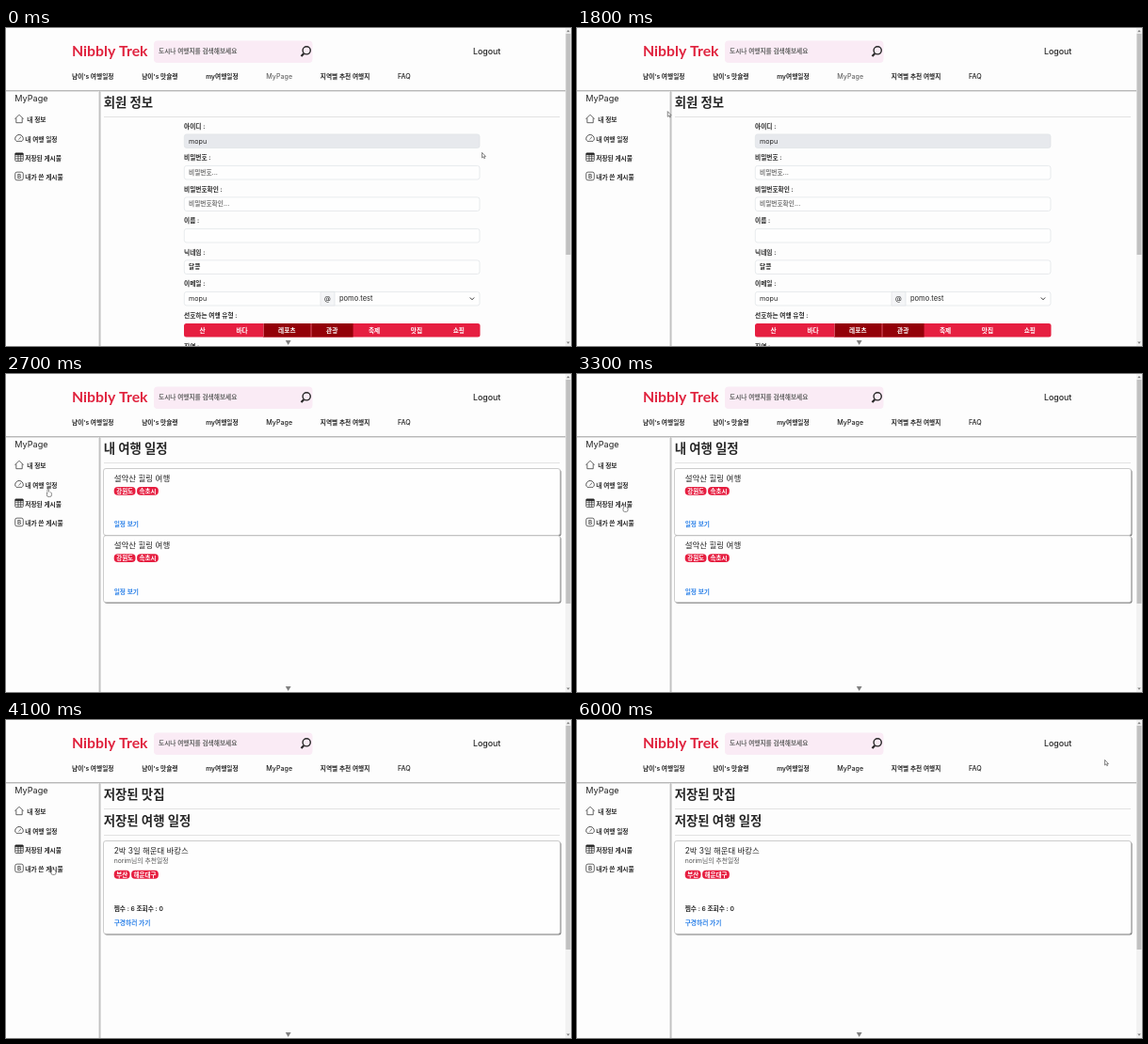
These frames come from a looping animation (600 by 338 pixels, 6.1 s). An HTML page with a canvas:

```html
<!DOCTYPE html>
<html lang="ko">
<head>
<meta charset="utf-8">
<style>
html, body { margin: 0; width: 100%; height: 100%; overflow: hidden; background: #fdfdfd; }
canvas { display: block; width: 600px; height: 338px; }
</style>
</head>
<body>
<canvas id="stage" width="600" height="338"></canvas>
<script>
const ctx = document.getElementById('stage').getContext('2d');
const LOOP = 6100, STEP = 100;
const INK = '#262626', RED = '#e61e40', DARK_RED = '#930008', BLUE = '#2b80e8', LINE = '#dfe2e6';
const FONT = "Inter, 'Noto Sans CJK KR', 'Noto Sans CJK', sans-serif";

// Each move: start time, end time, destination
const MOVES = [
  [0, 400, 560, 126], [800, 900, 67, 108], [1400, 1700, 115, 86], [1700, 2100, 38, 95],
  [2100, 2500, 41, 118], [2600, 3100, 48, 138], [3500, 4100, 47, 156],
  [4800, 5100, 50, 124], [5100, 5500, 594, 48], [5500, 6000, 560, 42]
];

const progress = (t, from, to) => Math.min(1, Math.max(0, (t - from) / (to - from)));

function setFont(size, weight, family = FONT) {
  ctx.font = `${weight} ${size}px ${family}`;
}

// Draws text centred on a line and returns its width
function text(str, x, centerY, { size = 6.7, weight = 600, color = INK, align = 'left', family } = {}) {
  setFont(size, weight, family);
  ctx.fillStyle = color;
  ctx.textAlign = align;
  ctx.fillText(str, x, centerY + size * 0.36);
  return ctx.measureText(str).width;
}

function rect(x, y, w, h, color) {
  ctx.fillStyle = color;
  ctx.fillRect(x, y, w, h);
}

function paint(fill, stroke, width = 0.7) {
  if (fill) { ctx.fillStyle = fill; ctx.fill(); }
  if (stroke) { ctx.strokeStyle = stroke; ctx.lineWidth = width; ctx.stroke(); }
}

function box(x, y, w, h, radius, fill, stroke, width) {
  ctx.beginPath();
  ctx.roundRect(x, y, w, h, radius);
  paint(fill, stroke, width);
}

function path(points, fill, stroke, width) {
  ctx.beginPath();
  points.forEach(([x, y]) => ctx.lineTo(x, y));
  paint(fill, stroke, width);
}

function arc(x, y, r, from, to, width) {
  ctx.beginPath();
  ctx.arc(x, y, r, from, to);
  paint(null, INK, width);
}

function triangle(x, y, halfWidth, height) {
  path([[x - halfWidth, y], [x + halfWidth, y], [x, y + height]], '#808080');
}

function drawHeader(t) {
  text('Nibbly Trek', 70, 24.5, { size: 15.8, weight: 700, color: '#e0243f', family: 'Lato, sans-serif' });
  box(157, 13.5, 168.5, 23.5, 4, '#faebf5');
  text('도시나 여행지를 검색해보세요', 162, 25, { color: '#666' });
  path([[316.2, 27.2], [313.5, 30]], null, INK, 2.2);
  arc(319.2, 23.8, 4.1, 0, Math.PI * 2, 1.4);
  text('Logout', 496, 25, { size: 8.8, weight: 500 });

  const shade = 105 - 75 * progress(t, 2100, 2500);
  let x = 70;
  for (const label of ["냠이's 여행일정", "냠이's 맛슐랭", 'my여행일정', 'MyPage', '지역별 추천 여행지', 'FAQ']) {
    const style = /^[A-Z]/.test(label) ? { size: 7.1, weight: 500 } : {};
    if (label === 'MyPage') style.color = `rgb(${shade},${shade},${shade})`;
    x += text(label, x, 51.8, style) + 29.7;
  }
  rect(0, 66, 594, 1, '#b8b8b8');
  rect(0, 67, 594, 1, '#e0e0e0');
}

function drawHouse() {
  path([[-4.5, 0], [0, -4.5], [4.5, 0]], null, INK);
  path([[-3.2, -1], [-3.2, 4], [3.2, 4], [3.2, -1]], null, INK);
}

function drawGauge() {
  arc(0, 0.8, 4.3, Math.PI * 0.9, Math.PI * 2.1, 0.8);
  path([[-4, 2.2], [-3, 3.4], [3, 3.4], [4, 2.2]], null, INK);
  path([[-0.6, 1.4], [2, -1.2]], null, INK);
}

function drawTable() {
  box(-4.3, -4.3, 8.6, 8.6, 1, null, INK);
  rect(-4.3, -4.3, 8.6, 2, INK);
  for (const line of [-1.4, 1.4]) {
    rect(line, -4, 0.7, 8, INK);
    rect(-4, line, 8, 0.7, INK);
  }
}

function drawLetter() {
  box(-4.3, -4.3, 8.6, 8.6, 2, null, INK);
  text('B', 0, 0, { size: 6.3, weight: 500, align: 'center' });
}

function drawSidebar() {
  rect(98, 67, 1, 271, '#e4e4e4');
  rect(99, 67, 1, 271, '#c2c2c2');
  rect(100, 67, 1, 271, '#dedede');
  text('MyPage', 9.3, 75, { size: 9.1, weight: 400 });
  const items = [['내 정보', drawHouse], ['내 여행 일정', drawGauge],
    ['저장된 게시물', drawTable], ['내가 쓴 게시물', drawLetter]];
  items.forEach(([label, icon], i) => {
    const y = 98 + i * 20.25;
    text(label, i ? 20.3 : 22.3, y);
    ctx.save();
    ctx.translate(14, y - 1.3);
    icon();
    ctx.restore();
  });
}

function drawTitle(label, y) {
  text(label, 103.7, y, { size: 13.4, weight: 700 });
  rect(104, y + 15, 484, 1, '#e2e2e2');
}

function drawTravelKinds() {
  box(189, 314, 314.5, 14.5, 2.5, RED);
  let x = 189;
  for (const label of ['산', '바다', '레포츠', '관광', '축제', '맛집', '쇼핑']) {
    const width = 33.3 + 5.8 * label.length;
    if (label === '레포츠' || label === '관광') {
      rect(x, 314, width, 14.5, DARK_RED);
      rect(x, 314, 0.7, 14.5, '#ef7085');
    }
    text(label, x + width / 2, 321.4, { color: '#fff', align: 'center' });
    x += width;
  }
}

function drawForm() {
  drawTitle('회원 정보', 79);
  const rows = [['아이디', 'mopu'], ['비밀번호', '비밀번호...'], ['비밀번호확인', '비밀번호확인...'],
    ['이름', ''], ['닉네임', '달콩'], ['이메일', 'mopu']];
  rows.forEach(([label, value], i) => {
    const y = 104.4 + i * 33.5;
    text(label + ' :', 189, y);
    box(189.3, y + 8.5, 313.7, 14.6, 2.5, i ? '#fefefe' : '#e7e9ed', LINE);
    const style = value === 'mopu' ? { size: 7.2, weight: 400 } : {};
    if (value.endsWith('...')) style.color = '#777';
    text(value, 194, y + 15.6, style);
  });
  box(334, 280.4, 15, 14.6, 0, '#f4f5f7', LINE);
  text('@', 341.4, 287.5, { size: 7, weight: 400, align: 'center' });
  text('pomo.test', 354, 287.5, { size: 7.5, weight: 400 });
  path([[492.8, 286.5], [495, 288.8], [497.2, 286.5]], null, INK, 0.9);
  text('선호하는 여행 유형 :', 189, 305.3);
  drawTravelKinds();
  text('지역 :', 189, 338.8);
}

function drawCard(y, h) {
  box(104.5, y + 1, 485, h, 2.5, '#777');
  box(103.5, y, 485, h, 2.5, '#fefefe', '#b8b8b8');
}

function drawBadges(labels, y) {
  let x = 114.7;
  for (const label of labels) {
    setFont(6.5, 600);
    const width = ctx.measureText(label).width + 4.9;
    box(x, y - 4.4, width, 8.9, 4, RED);
    text(label, x + width / 2, y, { size: 6.5, color: '#fff', align: 'center' });
    x += width + 1.5;
  }
}

function drawTrips() {
  drawTitle('내 여행 일정', 79);
  for (const y of [100.5, 171.8]) {
    drawCard(y, 71);
    text('설악산 힐링 여행', 114.7, y + 10.6, { size: 8.5, weight: 400 });
    drawBadges(['강원도', '속초시'], y + 23.8);
    text('일정 보기', 114.7, y + 59.5, { color: BLUE });
  }
}

function drawSaved() {
  drawTitle('저장된 맛집', 79);
  drawTitle('저장된 여행 일정', 107);
  drawCard(128.5, 98.9);
  text('2박 3일 해운대 바캉스', 114.7, 139, { size: 8.4, weight: 400 });
  text('norim님의 추천일정', 114.7, 149.2, { size: 6.8, weight: 400, color: '#555' });
  drawBadges(['부산', '해운대구'], 164.2);
  text('찜수 : 6 조회수 : 0', 114.7, 200.2);
  text('구경하러 가기', 114.7, 215.7, { color: BLUE });
}

function drawScrollbar(t) {
  const hovered = t >= 5500 && t < 5800;
  rect(594, 0, 6, 338, '#f2f2f2');
  rect(594.5, 6, 5, t < 2700 ? 235 : 238, hovered ? '#a8a8a8' : '#c1c1c1');
  triangle(597, 4.2, 1.8, -2.2);
  triangle(597, 333.5, 1.8, 2.2);
  triangle(299.7, 332, 2.9, 5);
}

function drawPointer(t) {
  let x = 505, y = 132;
  for (const [from, to, toX, toY] of MOVES) {
    const k = progress(t, from, to);
    x += (toX - x) * k;
    y += (toY - y) * k;
  }
  const overMenu = x < 60 && y > 90;
  ctx.save();
  ctx.translate(x, y);
  if (overMenu) {
    box(1, 3.6, 5, 4.8, 1.6, '#fff', '#555');
    box(1.6, 0.4, 1.5, 5, 0.7, '#fff', '#555', 0.6);
    rect(1.9, 3.4, 3, 3, '#fff');
  } else {
    path([[0.5, 0.4], [0.5, 6], [1.8, 4.9], [2.9, 6.8], [3.5, 6.4], [2.7, 4.6], [4.4, 4.5], [0.5, 0.4]], '#fff', '#555');
  }
  ctx.restore();
}

function draw(t) {
  rect(0, 0, 600, 338, '#fdfdfd');
  drawHeader(t);
  drawSidebar();
  if (t < 2700) drawForm();
  else if (t < 3600) drawTrips();
  else drawSaved();
  drawScrollbar(t);
  drawPointer(t);
}

const start = performance.now();
function tick() {
  const elapsed = (performance.now() - start) % LOOP;
  draw(Math.floor(elapsed / STEP) * STEP);
  requestAnimationFrame(tick);
}
tick();
</script>
</body>
</html>
```
